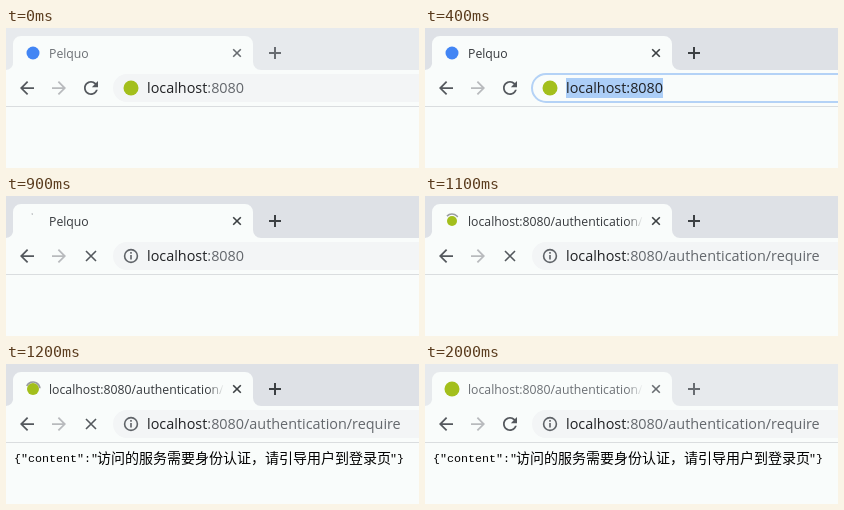
An HTML page that plays this animation: 413x140 px, repeating every 2100 ms.

```html
<!DOCTYPE html>
<html lang="en">
<head>
<meta charset="utf-8">
<title>Browser redirect</title>
<style>
  html, body { margin: 0; width: 100%; height: 100%; overflow: hidden; }
  svg { display: block; width: 413px; height: 140px; --page: #f9fcfb; --leaf: #a3bf1c; }
  text { font-family: "Open Sans", "Noto Sans", sans-serif; white-space: pre; }
  #title { font-size: 12.25px; fill: url(#fade); }
  #fade stop { stop-color: var(--title); }
  #url { font-size: 14.4px; fill: #202124; }
  #body text { font: 11.67px "Liberation Mono", monospace; fill: #000; }
  #body .cjk { font: 14px "Noto Sans CJK SC", "Noto Sans CJK", sans-serif; }
  .line { fill: none; stroke-width: 1.6; }
</style>
</head>
<body>
<svg viewBox="0 0 413 140">
  <defs>
    <linearGradient id="fade" gradientUnits="userSpaceOnUse" x1="202" x2="218" y1="0" y2="0">
      <stop/><stop offset="1" stop-opacity="0"/>
    </linearGradient>
    <path id="arrow" d="M20 11H7.83l5.59-5.59L12 4l-8 8 8 8 1.41-1.41L7.83 13H20z"/>
  </defs>

  <rect id="strip" width="413" height="42"/>
  <path fill="var(--page)" d="M0 140V42a7 7 0 0 0 7-8V16a8 8 0 0 1 8-8H239a8 8 0 0 1 8 8V34a8 8 0 0 0 8 8H413V140z"/>
  <path fill="#dadddf" d="M0 78H413v1H0z"/>

  <circle id="favicon" cx="27" cy="25"/>
  <circle id="spinner" class="line" cx="27" cy="25" r="7" pathLength="100" stroke="#9a9da1"/>
  <text id="title" x="43" y="30"></text>
  <path id="tabClose" class="line" d="M227.2 21.2l7.6 7.6m0-7.6l-7.6 7.6"/>
  <path id="newTab" class="line" style="stroke-width:2" d="M263 25h12m-6-6v12"/>

  <g fill="#54585d">
    <use href="#arrow" transform="translate(10.5 49.5) scale(.875)"/>
    <use href="#arrow" transform="translate(63.5 49.5) scale(-.875 .875)" fill="#b8babd"/>
    <path id="reload" transform="translate(74.5 49.5) scale(.875)" d="M17.65 6.35C16.2 4.9 14.21 4 12 4c-4.42 0-7.99 3.58-7.99 8s3.57 8 7.99 8c3.73 0 6.84-2.55 7.73-6h-2.08c-.82 2.33-3.04 4-5.65 4-3.31 0-6-2.69-6-6s2.69-6 6-6c1.66 0 3.14.69 4.22 1.78L13 11h7V4z"/>
    <path id="stop" class="line" stroke="#54585d" d="M80 55l10 10m0-10l-10 10"/>
  </g>

  <rect id="box" x="107" y="46" width="330" height="28" rx="14" stroke-width="2"/>
  <circle id="siteIcon" cx="125" cy="60" r="7.5" fill="var(--leaf)"/>
  <g id="info" class="line" stroke="#5f6368">
    <circle cx="125" cy="60" r="6.4"/>
    <path d="M125 59v4.5M125 56v1.7"/>
  </g>
  <rect id="selection" x="141" y="50" width="97" height="20" fill="#accef7"/>
  <text id="url" x="141" y="65">localhost<tspan id="path"></tspan></text>

  <g id="body">
    <text x="8" y="98">{"content":"</text>
    <text class="cjk" x="91" y="99">访问的服务需要身份认证，请引导用户到登录页</text>
    <text x="384" y="98">"}</text>
  </g>
</svg>
<script>
  const el = id => document.getElementById(id);
  const set = (id, attrs) => {
    for (const name in attrs) el(id).setAttribute(name, attrs[name]);
  };
  const show = (id, on) => set(id, { visibility: on ? 'visible' : 'hidden' });
  const svg = document.querySelector('svg');

  function draw(t) {
    const active = t >= 400 && t < 2000;
    const hover = t >= 200 && t < 400 || t >= 1600 && t < 2000;
    const focus = t >= 400 && t < 900;
    const started = t >= 900;
    const redirected = t >= 1100;
    const loading = started && t < 1300;
    const step = Math.floor((t - 900) / 100);
    const ink = active ? '#3c4043' : '#686c71';

    set('strip', { fill: active ? '#dee1e6' : '#e7eaed' });
    svg.style.setProperty('--title', active ? '#35383c' : '#6b6f74');
    set('tabClose', { stroke: ink });
    set('newTab', { stroke: ink });

    el('title').textContent = redirected ? 'localhost:8080/authentication/require' : 'Pelquo';
    show('favicon', !started || redirected);
    set('favicon', {
      r: redirected ? Math.min(7.5, 3 + step) : 6.5,
      fill: redirected ? 'var(--leaf)' : '#4285f4'
    });
    show('spinner', loading);
    set('spinner', {
      'stroke-dasharray': `${2 + 13 * step} 100`,
      transform: `rotate(${-100 - 18 * step} 27 25)`
    });
    show('reload', !loading);
    show('stop', loading);

    set('box', {
      fill: focus ? 'var(--page)' : hover ? '#e8ebec' : '#f3f5f6',
      stroke: focus ? '#b4d2f6' : 'none'
    });
    show('siteIcon', !started);
    show('info', started);
    show('selection', focus);
    el('path').textContent = ':8080' + (redirected ? '/authentication/require' : '');
    set('path', { fill: focus ? '#202124' : '#63676c' });
    show('body', t >= 1200);
  }

  function tick() {
    draw(performance.now() % 2100);
    requestAnimationFrame(tick);
  }
  tick();
</script>
</body>
</html>
```
